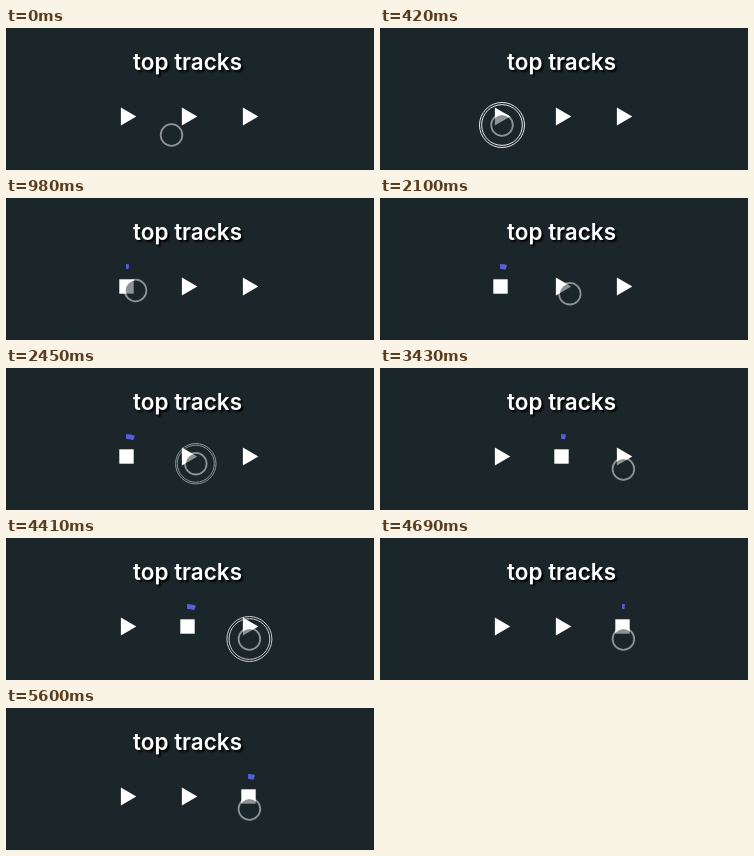
Recreate the animation shown at these times as an HTML page. Size 368 px wide and 142 px high, loop 5670 ms.

```html
<!DOCTYPE html>
<html lang="en">
<head>
<meta charset="utf-8">
<title>Top tracks</title>
<style>
  html, body { margin: 0; width: 100%; height: 100%; overflow: hidden; background: #1b262a; }
  svg { display: block; width: 100%; height: 100%; }
  text { font: 600 22.5px Inter, "Open Sans", sans-serif; fill: #fff; text-shadow: 2px 2px 2px #000; }
</style>
</head>
<body>
<svg id="stage" viewBox="0 0 368 142">
  <text x="181.5" y="42.3" text-anchor="middle">top tracks</text>
  <g id="players"></g>
  <g id="cursor">
    <circle r="10" fill="#1b262a" fill-opacity=".5"/>
    <circle r="10.8" fill="none" stroke="#fff" stroke-opacity=".5" stroke-width="1.8"/>
    <g id="ripple" fill="none" stroke="#e4e6e6">
      <circle/><circle/>
    </g>
  </g>
</svg>
<script>
const LOOP = 5670, STEP = 70;
const BEAT = 490; // length of a click ripple and of one progress step
const NS = "http://www.w3.org/2000/svg";
const $ = id => document.getElementById(id);

// One click per track; it starts playing when the ripple ends.
const clicks = [210, 2100, 4130];
const tracks = clicks.map((click, i) => ({
  x: 120.5 + 61 * i,
  start: click + BEAT,
  stop: i + 1 < clicks.length ? clicks[i + 1] + BEAT : LOOP
}));

const origin = { x: 165.5, y: 107 };
const moves = [
  { from: 0, to: 210, x: 122, y: 97, sag: 0 },
  { from: 420, to: 980, x: 129.6, y: 92.5, sag: 0 },
  { from: 980, to: 1330, x: 189.8, y: 95.7, sag: 0 },
  { from: 2590, to: 3290, x: 243.4, y: 101, sag: 5 }
];

function add(parent, tag, attrs) {
  const node = document.createElementNS(NS, tag);
  for (const key in attrs) node.setAttribute(key, attrs[key]);
  return parent.appendChild(node);
}

for (const tr of tracks) {
  const g = add($("players"), "g", { transform: `translate(${tr.x} 88.5)` });
  tr.play = add(g, "path", { d: "M-5.6-9L9.8 0L-5.6 9Z", fill: "#fff" });
  tr.square = add(g, "rect", { x: -7.2, y: -7.2, width: 14.4, height: 14.4, fill: "#fff" });
  tr.arc = add(g, "path", { fill: "none", stroke: "#5560dc", "stroke-width": 5 });
}

const show = (node, on) => node.setAttribute("visibility", on ? "visible" : "hidden");
const clamp = v => Math.max(0, Math.min(1, v));
const ease = k => k * k * (3 - 2 * k);

function pointerAt(t) {
  let { x, y } = origin;
  for (const m of moves) {
    const k = ease(clamp((t - m.from) / (m.to - m.from)));
    x += (m.x - x) * k;
    y += (m.y - y) * k + m.sag * Math.sin(Math.PI * k);
  }
  return [x, y];
}

function drawTrack(tr, t) {
  const on = t >= tr.start && t < tr.stop;
  show(tr.play, !on);
  show(tr.square, on);
  show(tr.arc, on);
  if (!on) return;
  const reach = 2.5 + 2 * Math.floor((t - tr.start) / BEAT);
  const angle = Math.asin(reach / 22.5);
  const end = `${20 * Math.sin(angle)} ${-20 * Math.cos(angle)}`;
  tr.arc.setAttribute("d", `M-.4-20A20 20 0 0 1 ${end}`);
}

function drawRipple(t) {
  const start = clicks.find(c => t > c && t < c + BEAT);
  show($("ripple"), start !== undefined);
  if (start === undefined) return;
  const k = (t - start) / BEAT;
  const grow = Math.sin(Math.PI * k);
  const r = 11 + 11.8 * grow;
  const [outer, inner] = $("ripple").children;
  outer.setAttribute("r", r);
  inner.setAttribute("r", r - 2.2 * grow);
  $("ripple").setAttribute("opacity", clamp(2 * (1 - k)));
}

function render(time) {
  const t = Math.floor((time % LOOP) / STEP) * STEP;
  tracks.forEach(tr => drawTrack(tr, t));
  $("cursor").setAttribute("transform", `translate(${pointerAt(t)})`);
  drawRipple(t);
}

let begin;
function tick(now) {
  begin ??= now;
  render(now - begin);
  requestAnimationFrame(tick);
}
render(0);
requestAnimationFrame(tick);
</script>
</body>
</html>
```
